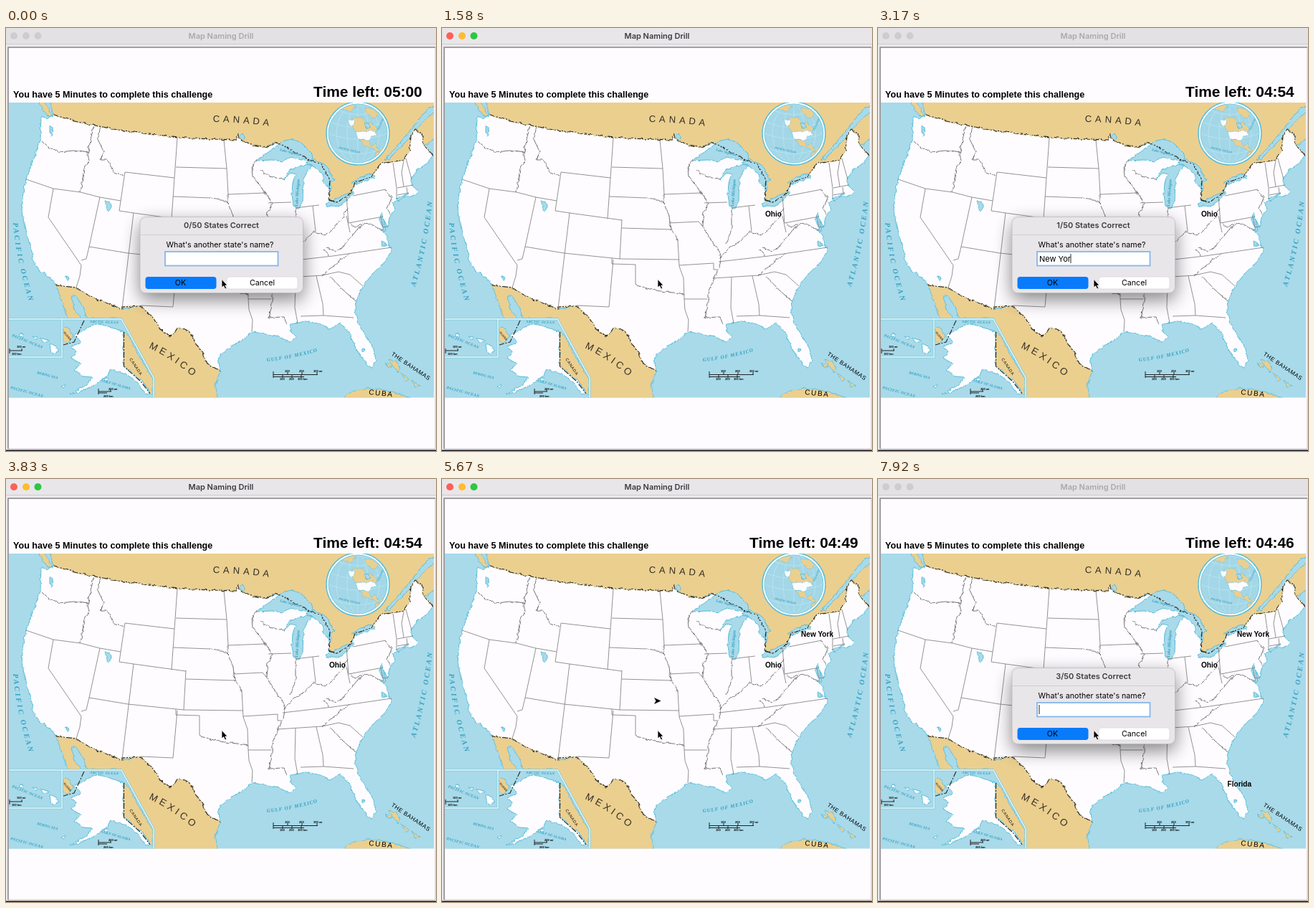
Recreate the animation shown at these times as an HTML page. Size 600 px wide and 590 px high, loop 8000 ms.

```html
<!DOCTYPE html>
<html lang="en">
<head>
<meta charset="utf-8">
<title>Map Naming Drill</title>
<style>
html, body { margin: 0; width: 100%; height: 100%; overflow: hidden; background: #ebe9ec; }
svg { display: block; width: 600px; height: 590px; }
text { font-family: "Liberation Sans", Arial, sans-serif; }
.ui { font-family: Inter, sans-serif; }
.bold { font-weight: 700; }
.mid { text-anchor: middle; }
.sea { font-family: "Liberation Serif", serif; font-style: italic; font-weight: 700; fill: #319fbe; }
.tan { fill: #ebcf8f; stroke: #68c1d9; }
.water { fill: #a8daea; stroke: #59bdd8; }
.white { fill: #fefcff; stroke: #59bdd8; }
.states { fill: none; stroke: #808080; stroke-width: .85; }
.rivers { stroke: #747474; stroke-width: 1; }
.join { fill: none; stroke: #e6d3a5; stroke-width: 2; }
.frontier { fill: none; stroke: #2b2925; stroke-width: 1.15; stroke-dasharray: 8 2 2 2; }
.inset { fill: none; stroke: #81cbdc; stroke-width: 3; }
.inset + .inset { stroke: #e7f7fc; stroke-width: 1.4; }
.tiny { font-size: 4px; font-weight: 700; }
</style>
</head>
<body>
<svg viewBox="0 0 600 590">
<defs>
  <filter id="rough" filterUnits="userSpaceOnUse" x="0" y="95" width="600" height="430" color-interpolation-filters="sRGB">
    <feTurbulence type="fractalNoise" baseFrequency=".16" numOctaves="2" seed="4"/>
    <feDisplacementMap in="SourceGraphic" scale="4.500" xChannelSelector="R" yChannelSelector="G"/>
  </filter>
  <filter id="shade" x="-30%" y="-40%" width="160%" height="200%"><feGaussianBlur stdDeviation="13"/></filter>
  <clipPath id="mapClip"><path d="M4 104H597V515.500H4Z"/></clipPath>
  <clipPath id="globeClip"><circle cx="491" cy="147" r="41"/></clipPath>
  <path id="pacific" d="M10 272Q14 325 36 394"/>
  <path id="atlantic" d="M571 361Q589 305 598 215"/>
  <path id="canada" d="M289 131Q330 131 377 138"/>
  <path id="mexico" d="M199 446Q236 463 268 493"/>
  <path id="gulf" d="M364 465Q405 461 444 448"/>
  <g id="landBorder">
    <path d="M66 121L100 131L150 141L200 148L260 154L321 156L323 148L329 157L345 163L362 166"/>
    <path d="M510 207L523 189L555 184L563 170L565 150L571 142L580 147L584 165L596 177"/>
    <path d="M70 359L97 362L125 378L162 392V389L188 388L205 404L215 420L228 430L233 428L239 419L250 420L257 425L263 437L273 452L281 468L298 478"/>
  </g>
</defs>

<!-- window -->
<rect id="bar" width="600" height="23"/>
<path d="M0 22.500H600" stroke="#cfcdd0"/>
<path d="M3 26.500H599V587H3Z" fill="#fefcff" stroke="#c5c3c6"/>
<path d="M3 587V27H599" fill="none" stroke="#8e8c8f" stroke-width="1.500"/>
<path d="M0 588.500H600V590H0Z" fill="#1b1820"/>
<circle class="light" cx="11" cy="11" r="5"/>
<circle class="light" cx="28" cy="11" r="5"/>
<circle class="light" cx="44.500" cy="11" r="5"/>
<text id="title" class="ui mid" x="300" y="14.500" font-size="11" font-weight="600">Map Naming Drill</text>
<text class="bold" x="10" y="97" font-size="12.600">You have 5 Minutes to complete this challenge</text>
<text id="clock" class="bold" x="429" y="95.500" font-size="20.900"></text>

<!-- map -->
<g clip-path="url(#mapClip)">
  <rect x="4" y="104" width="593" height="412" fill="#a8daea"/>
  <g filter="url(#rough)">
    <path class="tan" d="M58 90L66 122L150 150L320 165L370 170L425 190L449 206L454 222L447 245L470 239L490 222L515 210L525 195L560 190L576 150L584 165L590 160L599 153L610 150V90Z"/>
    <path class="water" d="M529 183L546 165L562 145L578 125L591 111L610 104V113L594 121L583 130L567 149L550 167L534 183Z"/>
    <path class="tan" d="M40 90L48 108L57 121L65 125L60 113L54 104V90Z"/>
    <path class="tan" d="M70 359L97 362L162 392L188 388L230 410L262 418L300 478L292 497L297 525H200L160 405H113L108 390L98 374L91 374L96 393L108 410L88 408L79 385Z"/>
    <path class="white" d="M49 124L57 127L66 121L100 131L150 141L200 148L260 154L321 156L323 148L329 157L345 163L362 166L378 160L400 171L425 185L440 190L452 212L450 240L462 243L480 232L487 216L510 207L523 189L555 184L563 170L565 150L571 142L580 147L584 165L596 177L588 188L573 199L565 211L567 221L575 228L568 234L550 236L540 244L542 254L536 262L532 277L527 266L525 281L532 294L538 312L526 329L511 343L500 358L490 375L487 394L491 411L502 428L513 448L516 463L510 474L503 468L491 452L484 438L480 425L466 412L451 420L436 412L418 409L398 413L396 422L405 432L395 438L382 430L363 427L345 424L322 439L299 455L296 466L298 478L281 468L273 452L263 437L257 425L250 420L239 419L233 428L228 430L215 420L205 404L188 388L162 389V392L125 378L97 362L70 359L62 348L47 338L38 325L36 311L27 282L22 256L24 229L29 207L38 184L48 157Z"/>
    <path class="water" d="M350 185L362 176L376 166L386 158L398 155L412 160L427 175L428 184L412 184L398 180L386 186L372 184Z"/>
    <path class="water" d="M418 190L428 192L420 200L415 212L414 244L408 252L401 248L399 232L400 215L405 202L397 203L388 211L395 199L408 194Z"/>
    <path class="water" d="M418 188L430 183L444 190L452 200L458 212L451 216L449 222L443 214L441 203L432 195Z"/>
    <path class="water" d="M446 250L447 244L457 240L468 234L484 228V232L476 240L464 249L454 248ZM483 216L493 209L510 203L514 208L504 213L488 218Z"/>
    <path class="water" d="M138 241L145 243L147 251L142 257ZM61 136L64 140L65 150L61 147ZM325 152L330 147L334 154L329 159ZM83 347L88 348L87 353ZM496 447L501 448L499 453Z"/>
    <path class="water" d="M524 258L521 267L527 283L530 284L528 270ZM524 298L533 302L525 304ZM544 237L562 231L548 241Z"/>
    <path class="tan" d="M534 462L546 466L550 476L546 480ZM550 480L562 489L558 492ZM566 492L578 499L571 501ZM528 467L539 472L535 474ZM470 515L482 507L507 502L535 506L565 516V525H470Z"/>
    <g class="states rivers">
      <path d="M51 158L60 167L75 173L95 171L115 174M122 137L114 176L116 185L109 196L104 229M132 138L128 155L136 172L132 184L142 184L149 200L165 206"/>
      <path d="M350 183L343 195L344 207L355 221L362 230L372 244L365 257L363 275L372 290L380 302L390 316L388 329L380 349L371 370V385L367 404L388 403L392 414M309 232V244L317 262L319 281L324 288L329 296M285 237L300 239L310 245M270 357L285 363L305 367L338 371"/>
      <path d="M390 319L402 305L415 298L430 284L445 289L455 281L470 265L476 250M443 309L450 318M448 306L460 311L471 305L485 286L501 272L512 275L525 282M404 250V281L397 301M355 198L368 207L388 211"/>
      <path d="M441 346L464 326L479 315M452 346L470 365L488 381M530 226L538 237L532 252L536 260M480 272L488 278L497 272"/>
    </g>
    <use href="#landBorder" class="join"/>
    <use href="#landBorder" class="frontier"/>
    <path class="frontier" d="M362 166L378 160L400 171L425 185L440 190L452 212L450 240L462 243L480 232L487 216L510 207"/>
  </g>
  <g class="states">
    <path d="M28 211L66 224L104 229L131 236L160 241M66 224L59 264L105 331L103 346L98 362M131 236L116 305L112 322L105 324M116 305L170 314L248 322M166 201L158 255L178 258L251 268M166 201L235 209M239 153L231 266M178 258L162 391M188 387L233 389L239 323"/>
    <path d="M237 194L308 196M233 235L285 237M304 156L308 196L310 232L362 230M251 267L248 322L331 323M251 279L319 281M237 321V329L270 330V357M329 296L331 332L337 349L338 378L339 393L344 407L343 424M317 272L358 270L363 276M331 331L379 328V337H385"/>
    <path d="M338 378H370M366 244L398 243M404 251L428 248L432 284M475 235L478 272L526 263M428 248L437 247M484 234L530 225M386 326L456 318L538 306M379 349L441 345L464 340L480 344L498 360M404 348L403 390L407 412M433 346L442 385L443 401M411 402L443 401L485 404"/>
    <path d="M540 188L545 223V238M555 185L552 202L555 221M558 182L566 211M546 223L568 219M546 233L562 230M559 222L560 230M523 263L526 278L532 277M387 316L390 321M475 262L480 285"/>
  </g>

  <!-- globe -->
  <circle cx="491" cy="147" r="44" fill="#fff" stroke="#5dbfd9" stroke-width="1.500"/>
  <g clip-path="url(#globeClip)">
    <circle cx="491" cy="147" r="41" fill="#a3d7e7"/>
    <g fill="none" stroke="#c5e7f0" stroke-width=".6">
      <ellipse cx="491" cy="147" rx="15" ry="41"/><ellipse cx="491" cy="147" rx="30" ry="41"/>
      <path d="M491 106V188M450 147Q491 163 532 147M454 132Q491 146 528 132M455 167Q491 184 527 167M465 116Q491 126 517 116"/>
    </g>
    <g filter="url(#rough)">
      <path class="tan" stroke-width=".5" d="M478 130L486 124L497 125L502 132L510 132L518 141L516 148L489 146ZM501 111L513 113L520 122L512 126L504 119ZM492 155L505 157L510 164L517 162L520 172L512 168L498 163ZM516 174L535 160V190H518ZM464 112L477 106L489 109L481 117Z"/>
      <path class="water" d="M500 133L506 133L509 139L503 141Z"/>
      <path class="white" stroke-width=".5" d="M488 145L513 143L518 148L510 152L507 158L501 155L491 155ZM477 128L487 127L485 136L479 136Z"/>
    </g>
    <text class="sea" transform="translate(464 168) rotate(13)" font-size="4">PACIFIC OCEAN</text>
    <text class="sea" transform="translate(520 143) rotate(-65)" font-size="4">ATLANTIC</text>
  </g>
  <circle cx="491" cy="147" r="41" fill="none" stroke="#77c9de"/>

  <!-- insets -->
  <path d="M4 406H161L206 488V516H4Z" fill="#a8daea"/>
  <g filter="url(#rough)">
    <path class="tan" d="M79 416L88 419L94 430L86 440L79 435ZM164 424L172 431L188 462L205 490V513L190 493L164 473Z"/>
    <path class="white" d="M95 428L111 419L129 412L145 417L164 424V471L177 482L190 493L201 509L196 511L184 496L172 485L156 479L146 475L142 484L130 494L112 504L90 511L112 498L121 487L108 486L96 477L104 468L92 461L98 451L90 445L105 439Z"/>
    <path class="white" d="M61 440L70 444L74 450L65 455L62 449ZM48 433L56 434L59 438L52 438ZM37 430L44 431L42 435ZM19 426L25 427L24 431L19 430ZM136 489L143 488L140 495ZM76 500L84 497L80 502Z"/>
  </g>
  <path class="frontier" d="M164.500 424V472L188 493L201 510M109 408L95 438L80 442"/>
  <path class="inset" d="M4 406H161L206 488V516M78 406V459H4"/>
  <path class="inset" d="M4 406H161L206 488V516M78 406V459H4"/>

  <!-- map lettering -->
  <text class="sea" font-size="10" letter-spacing="2.900"><textPath href="#pacific">PACIFIC OCEAN</textPath></text>
  <text class="sea" font-size="10" letter-spacing="2.700"><textPath href="#atlantic">ATLANTIC OCEAN</textPath></text>
  <text class="sea" font-size="7" letter-spacing=".9"><textPath href="#gulf">GULF OF MEXICO</textPath></text>
  <text font-size="13" letter-spacing="4.800" fill="#332f25"><textPath href="#canada">CANADA</textPath></text>
  <text font-size="13.500" letter-spacing="4" fill="#332f25"><textPath href="#mexico">MEXICO</textPath></text>
  <text transform="translate(537 456) rotate(34)" font-size="8" letter-spacing=".6">THE BAHAMAS</text>
  <text transform="translate(506 511) rotate(6)" font-size="10" letter-spacing="1.700">CUBA</text>
  <text transform="translate(172 462) rotate(56)" font-size="5.500" letter-spacing=".8">CANADA</text>
  <text transform="translate(80 425) rotate(50)" font-size="4">RUSSIA</text>
  <text class="sea" transform="translate(382 171) rotate(15)" font-size="5">Lake Superior</text>
  <text class="sea" transform="translate(407 249) rotate(-86)" font-size="6">Lake Michigan</text>
  <text class="sea" transform="translate(117 411) rotate(2)" font-size="5" letter-spacing=".3">ARCTIC OCEAN</text>
  <text class="sea" transform="translate(8 430) rotate(22)" font-size="5.500" letter-spacing=".3">PACIFIC OCEAN</text>
  <text class="sea" transform="translate(43 482) rotate(15)" font-size="5">BERING SEA</text>
  <text class="sea" transform="translate(6 503) rotate(15)" font-size="5.500" letter-spacing=".4">PACIFIC OCEAN</text>
  <text class="sea" transform="translate(133 493) rotate(16)" font-size="5">GULF OF ALASKA</text>
  <g fill="none" stroke="#222">
    <path d="M373 479V488M373 483.500H435M393 480V484M413 480V484M434 480V484M373 486.500H416M386 484V488M399 484V488M412 484V488"/>
    <path d="M5 447V454M5 450H23M22 447V450M129 503V511M129 507H147M146 504V507M129 509H141"/>
  </g>
  <g class="tiny">
    <text x="389" y="480">100</text><text x="409" y="480">200</text><text x="429" y="480">300 mi</text>
    <text x="382" y="491">100</text><text x="395" y="491">200</text><text x="407" y="491">300 km</text>
    <text x="15" y="446">100 mi</text><text x="8" y="456">100 km</text>
    <text x="143" y="505">200 mi</text><text x="136" y="515">200 km</text>
  </g>
</g>

<g class="bold" font-size="10.100">
  <text class="answer" x="451" y="263">Ohio</text>
  <text class="answer" x="501" y="219.500">New York</text>
  <text class="answer" x="487.500" y="428.500">Florida</text>
</g>
<path id="turtle" d="M305.500 309.500L296 305L298.500 309.500L296 314Z"/>

<g id="dialog">
  <rect x="187" y="272" width="228" height="107" rx="10" opacity=".48" filter="url(#shade)"/>
  <rect x="187" y="263.500" width="227.500" height="106" rx="8" fill="#e9e6ea" stroke="#bdbbbe" stroke-width=".8"/>
  <path d="M187.500 288.500H414" stroke="#d1ced2"/>
  <text id="score" class="ui mid" x="300.500" y="279" font-size="11" font-weight="600" fill="#3d3b3e"></text>
  <text class="ui mid" x="298.500" y="306" font-size="10.700">What's another state's name?</text>
  <rect x="222" y="312" width="157.500" height="19.500" fill="#fff" stroke="#86b6ec" stroke-width="1.800"/>
  <text id="entry" class="ui" x="225" y="326" font-size="11"></text>
  <path id="caret" d="M225 315V328" stroke="#222"/>
  <rect x="194.500" y="347" width="99" height="17" rx="4" fill="#087bfb"/>
  <rect x="308" y="347" width="99" height="17" rx="4" fill="#fff" stroke="#d7d4d8" stroke-width=".7"/>
  <text class="ui mid" x="243.500" y="359" font-size="10.700">OK</text>
  <text class="ui mid" x="357.500" y="359" font-size="10.700">Cancel</text>
</g>
<path d="M301 350.500V362L303.700 359.700L305.700 364L307.700 363L305.800 359H309Z" stroke="#fff" stroke-width=".8"/>
</svg>
<script>
const LOOP = 8000, KEY_GAP = 110;
const rounds = [
  { open: -250, name: 'Ohio', type: 580, close: 1330, arrow: 1420, mark: 1500, clear: 1580, clock: '05:00' },
  { open: 1670, name: 'New York', type: 2500, close: 3750, arrow: 3920, mark: 4000, clear: 4080, clock: '04:54' },
  { open: 4170, name: 'Florida', type: 4920, close: 5580, arrow: 5670, mark: 5750, clear: 5920, clock: '04:49' },
  { open: 6000, name: '', type: LOOP, close: LOOP, arrow: LOOP, mark: LOOP, clear: LOOP, clock: '04:46' }
];
const el = id => document.getElementById(id);
const show = (node, on) => node.style.display = on ? '' : 'none';
const lights = [...document.querySelectorAll('.light')];
const answers = [...document.querySelectorAll('.answer')];
const lightColors = ['#fe5f57', '#febc2e', '#2bc840'];

function draw(t) {
  const index = rounds.findLastIndex(r => t >= r.open);
  const r = rounds[index];
  const open = t < r.close;
  const typed = t < r.type ? 0 : Math.floor((t - r.type) / KEY_GAP) + 1;
  const blink = (t - r.open) % 900;

  show(el('dialog'), open);
  show(el('turtle'), t >= r.arrow && t < r.mark);
  el('clock').textContent = t < r.clear ? 'Time left: ' + r.clock : '';
  el('score').textContent = index + '/50 States Correct';
  el('entry').textContent = r.name.slice(0, typed);
  show(el('caret'), typed > 0 || blink < 230 || blink >= 530);
  const shift = open && typed ? el('entry').getComputedTextLength() : 0;
  el('caret').setAttribute('transform', `translate(${shift})`);
  answers.forEach((a, i) => show(a, t >= rounds[i].mark));

  el('bar').setAttribute('fill', open ? '#e4e1e5' : '#e9e6ea');
  el('title').setAttribute('fill', open ? '#aba8ac' : '#3f3c40');
  lights.forEach((l, i) => l.setAttribute('fill', open ? '#cfccd0' : lightColors[i]));
}

const start = performance.now();
function tick() {
  // a small lead keeps hard cuts from landing late
  draw((performance.now() - start + 30) % LOOP);
  requestAnimationFrame(tick);
}
tick();
</script>
</body>
</html>
```
